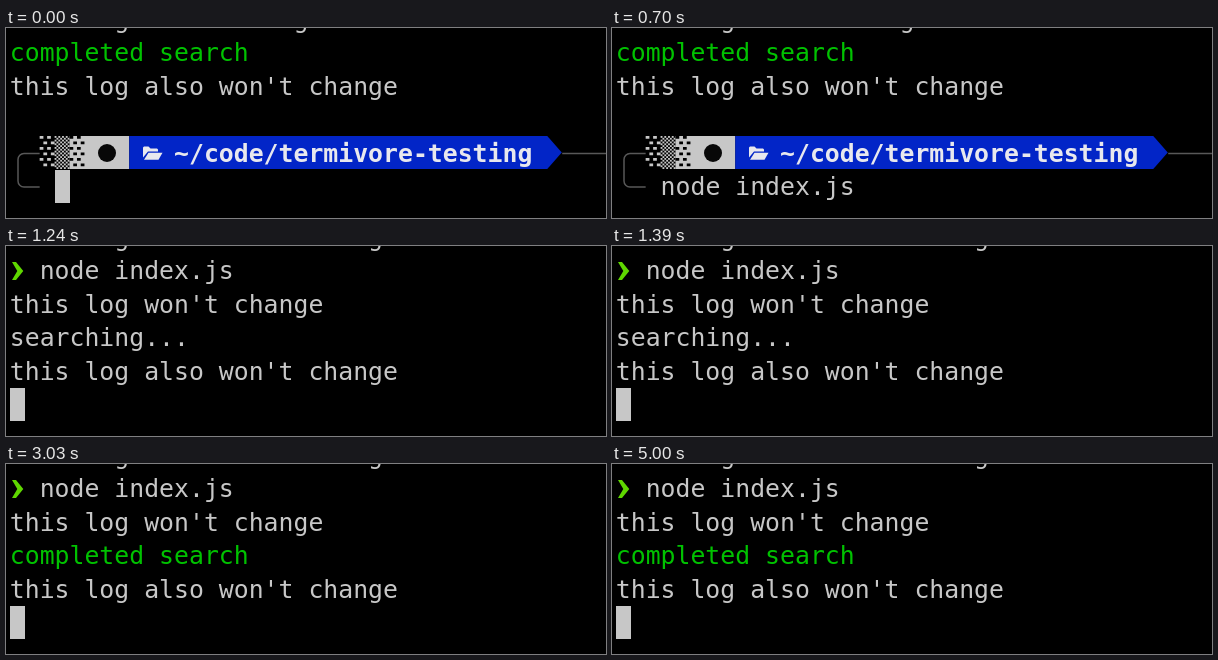
Animation, 600 px wide and 190 px high, one loop 5.03 s. Source, as an HTML page with a canvas:

```html
<!DOCTYPE html>
<html lang="en">
<head>
<meta charset="utf-8">
<title>Terminal log update</title>
<style>
  html, body { margin: 0; width: 100%; height: 100%; overflow: hidden; background: #000; }
  canvas { display: block; width: 600px; height: 190px; }
</style>
</head>
<body>
<canvas id="stage" width="600" height="190"></canvas>
<script>
const ctx = document.getElementById('stage').getContext('2d');

const LOOP = 5030;
const LEFT = 3.8, TOP = 8, CELL = 14.93, ROW = 33.5;
const FONT = '24.8px "DejaVu Sans Mono", monospace';
const GREY = '#c7c7c7', GREEN = '#00c200', BLUE = '#0225c7';
const LIME = '#5fd700', BRIGHT = '#e8e8ee', LINE = '#585858';

// Moments of change, in ms
const TYPED = 30, ENTER = 670, RUN = 730, OUTPUT = 970, DONE = 2970;

const COMMAND = 'node index.js';
const FIRST = "this log won't change";
const LAST = "this log also won't change";
const SEARCHING = 'searching...';
const COMPLETED = 'completed search';

const colX = col => LEFT + col * CELL;
const rowY = row => TOP + row * ROW;

function write(text, col, row, color = GREY, bold = false) {
  ctx.font = (bold ? 'bold ' : '') + FONT;
  ctx.fillStyle = color;
  ctx.fillText(text, colX(col), rowY(row) + 25.2);
}

function box(x, y, w, h, color) {
  ctx.fillStyle = color;
  ctx.fillRect(x, y, w, h);
}

function polygon(points, color) {
  ctx.fillStyle = color;
  ctx.beginPath();
  points.forEach(([x, y]) => ctx.lineTo(x, y));
  ctx.closePath();
  ctx.fill();
}

function cursor(col, row) {
  box(Math.round(colX(col)), Math.round(rowY(row)), 15, 33, GREY);
}

function chevron(row) {
  const y = rowY(row) + 8;
  polygon([[6, y], [10, y], [17.3, y + 9], [10, y + 18], [6, y + 18], [11.3, y + 9]], LIME);
}

// Staggered dots: one of four cells in each 2 x 4 block
function dots(x, y, color) {
  const w = CELL / 4, h = 33 / 12;
  for (let j = 0; j < 12; j += 2) {
    for (let i = (j / 2) % 2; i < 4; i += 2) box(x + i * w, y + j * h, w, h, color);
  }
}

function checks(x, y) {
  const w = CELL / 8, h = 33 / 18;
  for (let j = 0; j < 18; j++) {
    for (let i = j % 2; i < 8; i += 2) box(x + i * w, y + j * h, w, h, GREY);
  }
}

function folder(x, y) {
  polygon([[x, y + 11], [x, y + 1], [x + 1, y], [x + 5.5, y], [x + 7.5, y + 2],
    [x + 14, y + 2], [x + 15, y + 3], [x + 15, y + 5], [x + 5, y + 5]], BRIGHT);
  polygon([[x + 5.5, y + 6.2], [x + 19.5, y + 6.2], [x + 15.5, y + 13.2], [x + 1, y + 13.2]], BRIGHT);
}

function prompt() {
  const y = 108, h = 33, mid = 125.5, low = 159;

  ctx.strokeStyle = LINE;
  ctx.lineWidth = 1.5;
  ctx.beginPath();
  ctx.moveTo(colX(2), mid);
  ctx.arcTo(12, mid, 12, low, 6);
  ctx.arcTo(12, low, colX(2), low, 6);
  ctx.lineTo(colX(2), low);
  ctx.moveTo(colX(37), mid);
  ctx.lineTo(600, mid);
  ctx.stroke();

  dots(colX(2), y, GREY);
  checks(colX(3), y);
  box(colX(4), y, CELL * 4, h, GREY);
  dots(colX(4), y, '#000');

  ctx.fillStyle = '#080808';
  ctx.beginPath();
  ctx.arc(101, 125, 9, 0, Math.PI * 2);
  ctx.fill();

  const start = colX(8), end = colX(36);
  polygon([[start, y], [end, y], [end + 14.5, y + h / 2], [end, y + h], [start, y + h]], BLUE);
  folder(137, 118.5);
  write('~/code/termivore-testing', 11, 3, BRIGHT, true);
}

function drawPrompt(t) {
  write(FIRST, 0, -1);
  write(COMPLETED, 0, 0, GREEN);
  write(LAST, 0, 1);
  if (t >= RUN) {
    chevron(2);
    write(COMMAND, 2, 2);
    cursor(0, 3);
    return;
  }
  prompt();
  if (t < TYPED) {
    cursor(3, 4);
  } else {
    write(COMMAND, 3, 4);
    if (t < ENTER) cursor(16, 4);
  }
}

function drawOutput(t) {
  write(LAST, 0, -1);
  chevron(0);
  write(COMMAND, 2, 0);
  write(FIRST, 0, 1);
  if (t < DONE) write(SEARCHING, 0, 2);
  else write(COMPLETED, 0, 2, GREEN);
  write(LAST, 0, 3);
  cursor(0, 4);
}

const begin = performance.now();

function frame() {
  const t = (performance.now() - begin) % LOOP;
  box(0, 0, 600, 190, '#000');
  if (t < OUTPUT) drawPrompt(t);
  else drawOutput(t);
  requestAnimationFrame(frame);
}

frame();
</script>
</body>
</html>
```
